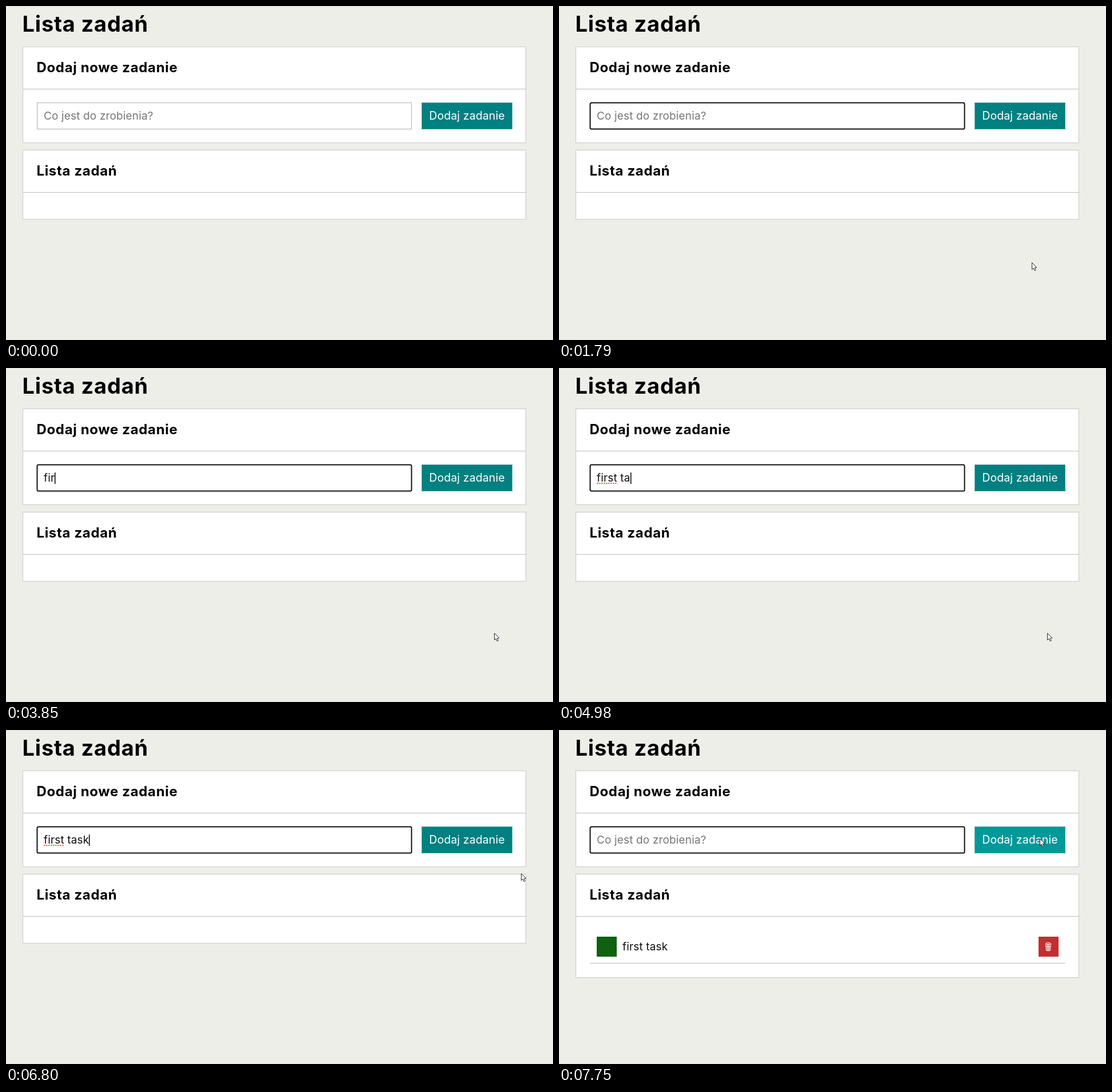
An HTML page with a canvas that plays this animation: 957 px wide and 585 px high, repeating every 8000 ms.

```html
<!DOCTYPE html>
<html lang="pl">
<head>
<meta charset="utf-8">
<title>Lista zadań</title>
<style>
html, body { margin: 0; width: 100%; height: 100%; overflow: hidden; background: #edeee8; }
canvas { display: block; }
</style>
</head>
<body>
<canvas id="stage" width="957" height="585"></canvas>
<script>
const ctx = document.getElementById('stage').getContext('2d');
const LOOP = 8000, BLINK = 530, STEP = 60;
const FAMILY = 'Inter, "Open Sans", sans-serif';
const TITLE = { font: `700 38px ${FAMILY}`, spacing: '0.8px' };
const HEADING = { font: `700 24px ${FAMILY}`, spacing: '0.65px' };
const BODY = { font: `400 19px ${FAMILY}`, spacing: '0.15px' };
const LABEL = { font: `400 19.5px ${FAMILY}`, spacing: '0.1px' };
const TASK = 'first task';
const KEY_TIMES = [2980, 3440, 3850, 4150, 4270, 4500, 4800, 4980, 5150, 5510];
const FOCUS = 1020, FOCUS_END = 1130, SPELLCHECK = 4570, PRESS = 7100, ADDED = 7220;

// Pointer moves: each stop is [time, x, y]
const MOVES = [
  [[170, 847, 564], [350, 690, 445], [550, 480, 275], [680, 400, 200], [790, 381, 184]],
  [[1360, 400, 194], [1560, 650, 335], [1790, 835, 454], [2100, 854, 464]],
  [[6270, 857, 461], [6420, 905, 425], [6580, 947, 330], [6740, 905, 255], [6870, 852, 205], [6990, 841, 190]]
];

function pointerAt(t) {
  const move = MOVES.filter(m => m[0][0] <= t).pop();
  if (!move) return null;
  const start = move[0][0], end = move[move.length - 1];
  if (t >= end[0]) return { x: end[1], y: end[2] };
  const time = start + Math.floor((t - start) / STEP) * STEP;
  const i = move.findIndex(stop => stop[0] > time);
  const [t0, x0, y0] = move[i - 1], [t1, x1, y1] = move[i];
  const k = (time - t0) / (t1 - t0);
  return { x: Math.round(x0 + (x1 - x0) * k), y: Math.round(y0 + (y1 - y0) * k) };
}

const inside = (p, x, y, w, h) => p && p.x >= x && p.x < x + w && p.y >= y && p.y < y + h;

function rect(x, y, w, h, color) {
  ctx.fillStyle = color;
  ctx.fillRect(x, y, w, h);
}

function box(x, y, w, h, fill, border) {
  rect(x, y, w, h, border);
  rect(x + 1, y + 1, w - 2, h - 2, fill);
}

function text(str, x, y, style, color = '#000', align = 'left') {
  ctx.font = style.font;
  ctx.letterSpacing = style.spacing;
  ctx.fillStyle = color;
  ctx.textAlign = align;
  ctx.fillText(str, x, y);
}

function section(title, y, h) {
  box(29, y, 881, h, '#fff', '#c9c9c9');
  rect(30, y + 74, 879, 1, '#bbb');
  text(title, 53.5, y + 45, HEADING);
}

function drawInput(t) {
  const focused = (t >= FOCUS && t < PRESS) || t >= ADDED;
  const typed = t < ADDED ? TASK.slice(0, KEY_TIMES.filter(k => k <= t).length) : '';
  if (focused) {
    ctx.beginPath();
    ctx.roundRect(54.5, 169.5, 655, 46, 2.5);
    ctx.strokeStyle = '#101010';
    ctx.lineWidth = 2;
    ctx.stroke();
  } else {
    box(54, 169, 656, 47, '#fff', '#b0b0b0');
  }
  text(typed || 'Co jest do zrobienia?', 66, 199, BODY, typed ? '#111' : '#757575');
  if (!focused) return;

  if (t >= SPELLCHECK && t < PRESS) {
    ctx.beginPath();
    ctx.moveTo(66, 202);
    ctx.lineTo(66 + ctx.measureText('first').width, 202);
    ctx.setLineDash([2.5, 1.5]);
    ctx.strokeStyle = '#f03030';
    ctx.lineWidth = 1.5;
    ctx.stroke();
    ctx.setLineDash([]);
  }
  const anchor = [FOCUS + 20, ...KEY_TIMES, ADDED].filter(k => k <= t).pop();
  if (Math.floor((t - anchor) / BLINK) % 2 === 0) {
    const width = typed ? ctx.measureText(typed).width : 0;
    rect(Math.round(66 + width), 183, 1.5, 20, '#000');
  }
}

function drawButton(t, pointer) {
  const hover = inside(pointer, 727, 169, 159, 47);
  const pressed = t >= PRESS && t < ADDED;
  const fill = pressed ? '#00b3b3' : hover ? '#009999' : '#008080';
  box(727, 169, 159, 47, fill, pressed ? '#50c0bc' : '#50a09e');
  text('Dodaj zadanie', 806.5, 199, LABEL, '#fff', 'center');
}

function drawTask() {
  rect(66, 362, 35, 35, '#0e610e');
  text(TASK, 111, 386, BODY, '#111');
  rect(839, 362, 35, 35, '#c62d30');
  rect(54, 408, 832, 1, '#bbb');

  // Wastebasket
  ctx.strokeStyle = '#fff';
  ctx.lineWidth = 1;
  ctx.beginPath();
  ctx.ellipse(856, 374, 4.5, 1.5, 0, 0, Math.PI * 2);
  for (const dx of [-4.5, -2, 0, 2, 4.5]) {
    ctx.moveTo(856 + dx, 374.5);
    ctx.lineTo(856 + dx * 0.75, 386);
  }
  ctx.moveTo(852.6, 386);
  ctx.quadraticCurveTo(856, 388, 859.4, 386);
  ctx.moveTo(852, 379.5);
  ctx.lineTo(860, 379.5);
  ctx.stroke();
}

function drawPointer(t, p) {
  if (!p) return;
  if ((t >= FOCUS && t < FOCUS_END) || (t >= PRESS && t < ADDED)) {
    ctx.beginPath();
    ctx.arc(p.x, p.y, 12, 0, Math.PI * 2);
    ctx.fillStyle = 'rgba(150, 225, 50, 0.8)';
    ctx.fill();
  }
  ctx.save();
  ctx.translate(p.x + 0.5, p.y + 0.5);
  ctx.beginPath();
  ctx.lineWidth = 1;
  if (inside(p, 54, 169, 656, 47)) {
    ctx.moveTo(-3, -6);
    ctx.lineTo(3, -6);
    ctx.moveTo(0, -6);
    ctx.lineTo(0, 6);
    ctx.moveTo(-3, 6);
    ctx.lineTo(3, 6);
    ctx.strokeStyle = '#222';
  } else {
    const outline = [[0, 0], [0, 12], [2.7, 9.5], [4.7, 14], [6.7, 13], [4.8, 8.8], [8.5, 8.5]];
    outline.forEach(([x, y]) => ctx.lineTo(x, y));
    ctx.closePath();
    ctx.fillStyle = '#fff';
    ctx.fill();
    ctx.strokeStyle = '#26262a';
  }
  ctx.stroke();
  ctx.restore();
}

function draw(t) {
  const pointer = pointerAt(t);
  rect(0, 0, 957, 585, '#edeee8');
  rect(0, 0, 957, 1, '#e0e1dc');
  rect(0, 584, 957, 1, '#e3e4df');
  text('Lista zadań', 28.5, 45, TITLE);
  section('Dodaj nowe zadanie', 71, 169);
  drawInput(t);
  drawButton(t, pointer);
  section('Lista zadań', 252, t >= ADDED ? 182 : 122);
  if (t >= ADDED) drawTask();
  drawPointer(t, pointer);
}

const startTime = performance.now();
function frame() {
  draw((performance.now() - startTime) % LOOP);
  requestAnimationFrame(frame);
}
frame();
</script>
</body>
</html>
```
